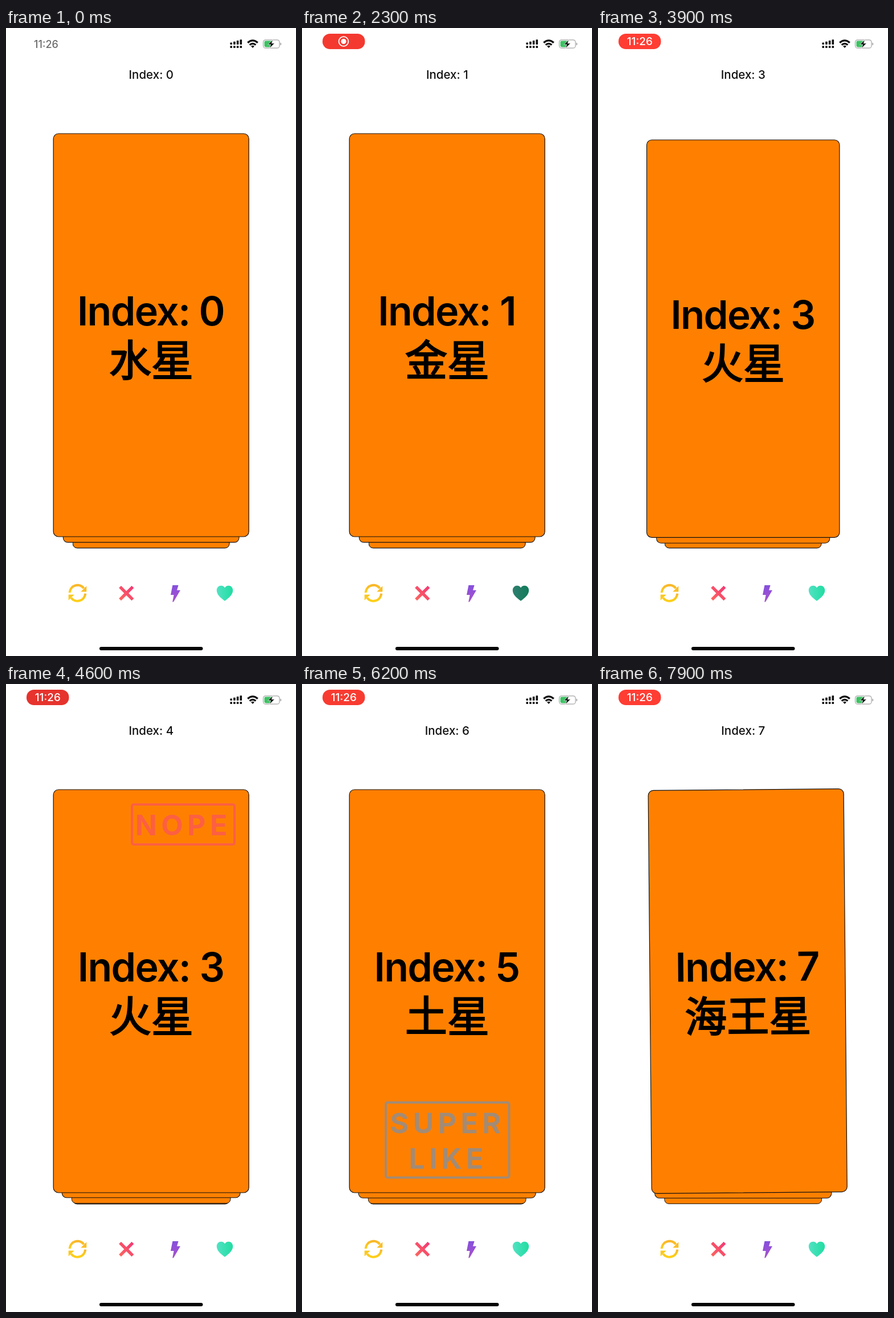
An HTML page for the animation above (8000 ms loop, 509x1100 px).

```html
<!DOCTYPE html>
<html lang="en">
<head>
<meta charset="utf-8">
<title>Swipe cards</title>
<style>
  html, body { margin: 0; width: 100%; height: 100%; overflow: hidden; background: #fff; }
  svg { display: block; width: 100vw; height: 100vh; }
  text { font-family: Inter, "Noto Sans", sans-serif; text-anchor: middle; }
  .title { font-size: 20.5px; font-weight: 500; }
  .clock { font-size: 18px; font-weight: 500; }
  #pillClock { font-size: 19px; }
  .index { font-size: 70px; font-weight: 600; letter-spacing: -1.7px; }
  .planet { font-family: "Noto Sans CJK SC", "Noto Sans CJK", sans-serif; font-size: 74px; stroke: #000; stroke-width: 2.2; }
  .face { fill: #ff8000; stroke: #111; stroke-width: 1.2; }
  .stamp text { font-size: 50px; font-weight: 700; letter-spacing: 7.4px; }
  .stamp rect { fill: none; stroke-width: 4; }
</style>
</head>
<body>
<svg viewBox="0 0 509 1100" preserveAspectRatio="none">
  <defs>
    <linearGradient id="yellow" x2="0" y2="1"><stop stop-color="#f9b72b"/><stop offset="1" stop-color="#fdd017"/></linearGradient>
    <linearGradient id="red" x1="0" y1="1" x2="1" y2="0"><stop stop-color="#fc6a5d"/><stop offset="1" stop-color="#f23576"/></linearGradient>
    <linearGradient id="purple" x2="0" y2="1"><stop stop-color="#8450dc"/><stop offset="1" stop-color="#a852cc"/></linearGradient>
    <linearGradient id="green" x2="1" y2="0"><stop stop-color="#52e2c4"/><stop offset="1" stop-color="#20dda0"/></linearGradient>
  </defs>

  <!-- status bar -->
  <text id="plainClock" class="clock" x="70.5" y="34.5" fill="#6b6b6b">11:26</text>
  <g id="pill">
    <rect id="pillBg" x="36" y="10" width="74.5" height="27" rx="13"/>
    <text id="pillClock" class="clock" x="73.3" y="30.3" fill="#fff">11:26</text>
    <g id="record"><circle cx="73" cy="23.5" r="8.4" fill="none" stroke="#fff" stroke-width="1.8"/><circle cx="73" cy="23.5" r="4.6" fill="#fff"/></g>
  </g>
  <g id="signal" fill="#111"></g>
  <g fill="none" stroke="#111" stroke-width="3.2">
    <path d="M424.2 25.8Q433 18 441.8 25.8"/>
    <path d="M427.6 29.6Q433 25 438.4 29.6"/>
    <path d="M430 31.8Q433 29.6 436 31.8L433 35Z" fill="#111" stroke="none"/>
  </g>
  <rect x="451.5" y="20.8" width="28.5" height="14.4" rx="4.2" fill="#fff" stroke="#a5a5a5" stroke-width="1.2"/>
  <rect x="453.4" y="22.6" width="13" height="10.8" rx="2.4" fill="#3cc263"/>
  <path d="M481.4 25.6q2 .6 2 2.4t-2 2.4Z" fill="#a5a5a5"/>
  <path d="M468.4 20.4L459.6 29H464.6L462.6 35.6L471.4 26.8H466.4Z" fill="#111" stroke="#fff" stroke-width=".7"/>

  <text id="title" class="title" x="254.8" y="88.8" fill="#111"></text>
  <g id="deck"></g>

  <!-- buttons -->
  <g fill="none" stroke="url(#yellow)" stroke-width="4.2">
    <path d="M111.8 989A13.8 13.8 0 0 1 136.6 981.4"/>
    <path d="M139.2 990.6A13.8 13.8 0 0 1 114.4 998.2"/>
    <path d="M141.3 977.4V987.4H131.3ZM109.7 1002.4V992.4H119.7Z" fill="url(#yellow)" stroke="none"/>
  </g>
  <path id="nopeBtn" fill="url(#red)" d="M202 977L211.3 986.2L220.6 977L224.4 980.8L215.2 990L224.4 999.2L220.6 1003L211.3 993.8L202 1003L198.2 999.2L207.4 990L198.2 980.8Z"/>
  <path id="superBtn" fill="url(#purple)" d="M292.4 976H302.6L300 984.8H306L294 1005.2H292.2L294.6 993H289Z"/>
  <path id="likeBtn" fill="url(#green)" d="M384 1003.5C376.5 998 369.8 992.5 369.8 985C369.8 980 373.5 976.8 377.4 976.8C380.4 976.8 382.8 978.2 384 980.6C385.2 978.2 387.6 976.8 390.6 976.8C394.5 976.8 398.2 980 398.2 985C398.2 992.5 391.5 998 384 1003.5Z"/>
  <rect x="164" y="1084" width="181.5" height="6" rx="3" fill="#050505"/>
</svg>
<script>
const LOOP = 8000, TICK = 100;
const CX = 254.7, CY = 538;
const DRAG_AT = 7800;
const planets = ['水星', '金星', '地球', '火星', '木星', '土星', '天王星', '海王星', '', ''];
// One entry per card, in order: when it is swiped and which way.
const swipes = [
  [1000, 'like'], [2350, 'like'], [3500, 'nope'], [4480, 'nope'],
  [5332, 'super'], [6110, 'super'], [7110, 'nope']
].map(([at, kind]) => ({ at, kind }));
const exits = { like: [620, 0], nope: [-620, 0], super: [0, -950] };
const stamps = {
  like: { color: '#35c96b', box: [107, 211, 154, 70], lines: [['LIKE', 185, 265]] },
  nope: { color: '#fc4f63', box: [221, 211, 180, 70], lines: [['NOPE', 311.2, 265]] },
  super: { color: '#4a96ea', box: [147, 733, 216.5, 131.5], lines: [['SUPER', 255.6, 787], ['LIKE', 256.6, 849]] }
};

const $ = id => document.getElementById(id);
const clamp = (v, lo = 0, hi = 1) => Math.min(hi, Math.max(lo, v));
const ease = u => (1 - Math.cos(Math.PI * clamp(u))) / 2;
const show = (el, on) => { el.style.display = on ? '' : 'none'; };

function stampMarkup(kind) {
  const { color, box: [x, y, w, h], lines } = stamps[kind];
  const words = lines.map(([s, tx, ty]) => `<text x="${tx}" y="${ty}">${s}</text>`).join('');
  return `<g class="stamp" fill="${color}" opacity="0">
    <rect x="${x}" y="${y}" width="${w}" height="${h}" rx="3" stroke="${color}"/>${words}</g>`;
}

// Later cards lie underneath, so they come first.
$('deck').innerHTML = planets.map((name, i) => `<g>
  <rect class="face" x="83.2" y="185" width="343" height="706" rx="9"/>
  <text class="index" x="254" y="520.5">Index: ${i}</text>
  <text class="planet" x="255" y="609">${name}</text>
  ${swipes[i] ? stampMarkup(swipes[i].kind) : ''}</g>`).reverse().join('');
const cards = [...$('deck').children].reverse();

$('signal').innerHTML = [0, 1, 2, 3].map(i => {
  const x = 393.4 + i * 5.7, h = 3.4 + i * 1.8;
  return `<rect x="${x}" y="${29 - h}" width="3.6" height="${h}" rx=".7"/><rect x="${x}" y="31.2" width="3.6" height="3.8" rx=".7"/>`;
}).join('');

function drawCard(i, t, active, drag) {
  const card = cards[i], swipe = swipes[i];
  const depth = clamp(i - active, 0, 2);
  const since = swipe ? t - swipe.at : -1;
  let dx = 0, dy = 45.2 * depth, turn = 0;
  if (since > 0) {
    const go = clamp((since - 170) / 230) ** 1.3;
    const [outX, outY] = exits[swipe.kind];
    dx = outX * go;
    dy += outY * go;
    turn = clamp(dx / 170, -1, 1) * 9;
  } else if (i === swipes.length && drag) {
    dx = drag;
    turn = -drag / 16;
  }
  show(card, since < 400 && i < active + 4);
  card.setAttribute('transform',
    `translate(${CX + dx} ${CY + dy}) rotate(${turn}) scale(${1 - depth / 10}) translate(${-CX} ${-CY})`);
  if (swipe) card.lastElementChild.setAttribute('opacity', clamp(since / 180));
}

function draw(t) {
  const drag = Math.max(0, t - DRAG_AT) * 0.08;
  const active = swipes.reduce((sum, s) => sum + ease((t - s.at) / 527), 0) + drag / 200;
  cards.forEach((_, i) => drawCard(i, t, active, drag));
  $('title').textContent = 'Index: ' + swipes.filter(s => t >= s.at).length;

  for (const kind in exits) {
    const down = swipes.some(s => s.kind === kind && t >= s.at - 150 && t < s.at - 20);
    $(kind + 'Btn').style.filter = down ? 'brightness(.56)' : '';
  }

  const recording = t >= 500, clock = t >= 3200;
  show($('plainClock'), !recording);
  show($('pill'), recording);
  show($('pillClock'), clock);
  show($('record'), !clock);
  const glow = Math.cos((t - 3900) / 1000 * Math.PI);
  $('pillBg').setAttribute('fill', `rgb(${239 + 16 * glow} ${55 + 6 * glow} ${47 + 4 * glow})`);
}

const start = performance.now();
function frame() {
  const t = (performance.now() - start + 4) % LOOP;
  draw(Math.floor(t / TICK) * TICK);
  requestAnimationFrame(frame);
}
frame();
</script>
</body>
</html>
```
